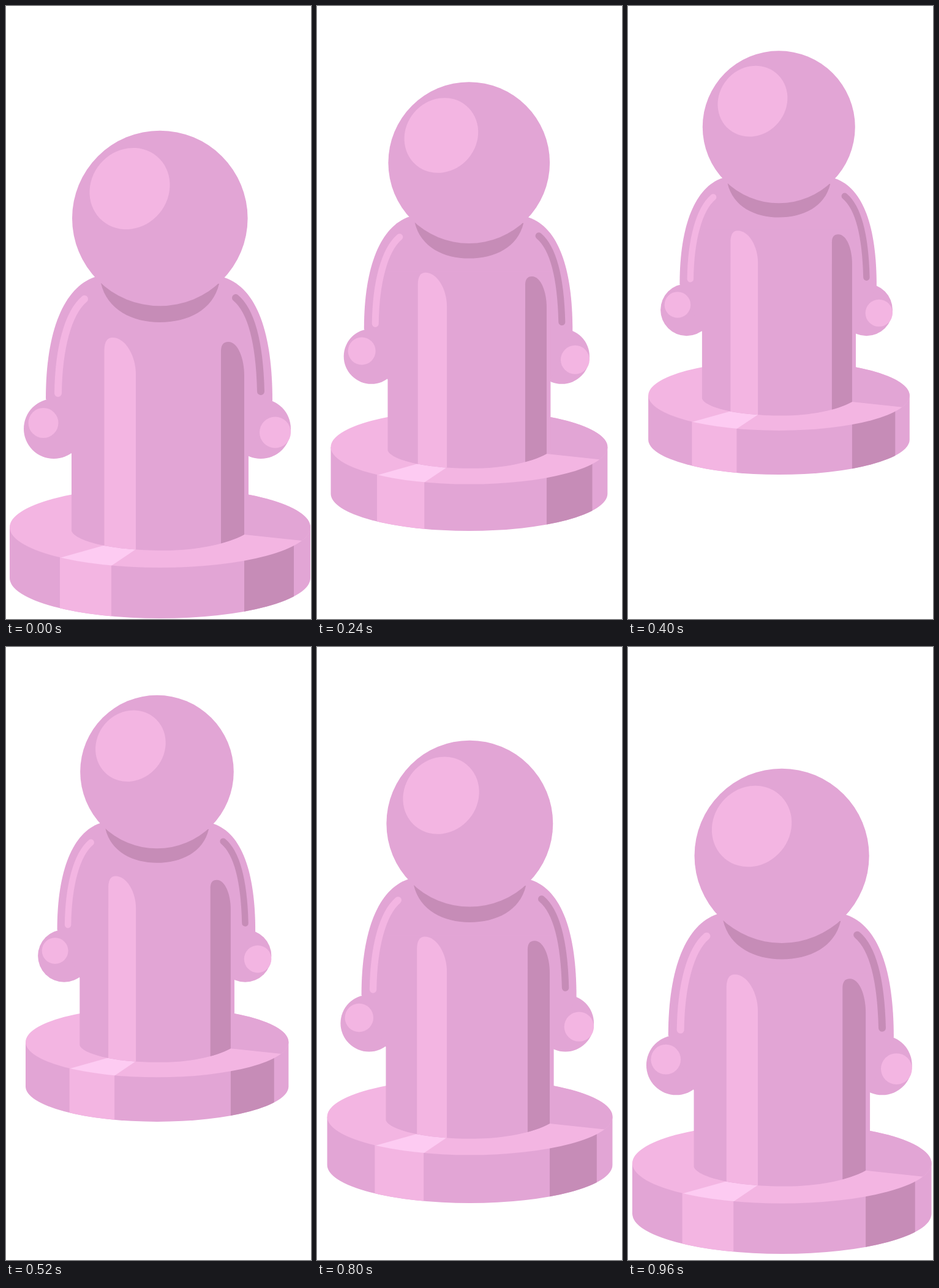
Write an HTML page with a canvas that moves like this. It is 498 px wide and 1002 px high and loops after 1000 ms.

```html
<!DOCTYPE html>
<html lang="en">
<head>
<meta charset="utf-8">
<title>Hopping pawn</title>
<style>
html, body { margin: 0; width: 100%; height: 100%; overflow: hidden; background: #fff; }
canvas { display: block; width: 498px; height: 1002px; }
</style>
</head>
<body>
<canvas id="stage" width="498" height="1002"></canvas>
<script>
const ctx = document.getElementById('stage').getContext('2d');

const BODY = '#e2a5d5', LIGHT = '#f3b5e2', DARK = '#c68cb7', SHINE = '#fdcbf2';
const LOOP = 1000, STEP = 40;

// The pawn shrinks towards this point as it rises.
const PIVOT = { x: 213, y: -791 };
const SCALE_KEYS = [
  [0, 1], [240, 0.9202], [400, 0.8689], [440, 0.8535], [480, 0.864], [520, 0.8744],
  [560, 0.8844], [680, 0.9163], [800, 0.9487], [960, 0.995], [1000, 1]
];

const FRONT = 'M107 732 V858 C112 873 165 890 258 890 C310 890 360 880 389 864 H396 V732';
const shapes = {
  side: new Path2D('M6 852 V935 A245.5 66 0 0 0 497 935 V852 Z'),
  plate: new Path2D('M6 852 A245.5 66 0 0 0 497 852 A245.5 66 0 0 0 6 852 Z'),
  plateShade: new Path2D('M389 780 V864 L483 874 H498 V780 Z'),
  plateShine: new Path2D('M88 902 L159 882 L212 888 L172 915 V925 H88 Z'),
  front: new Path2D(FRONT + ' V540 H107 Z'),
  torso: new Path2D('M145 443 C95 460 65 530 65 642 L107 732 H396 L435 645 C435 535 410 462 357 444 Z'),
  stripeLight: new Path2D('M160.5 900 V562 Q161 542 174 542 C195 542 212 572 212 602 V900 Z'),
  stripeDark: new Path2D('M351 900 V564 Q351 549 363 549 C379 549 389 577 389 604 V900 Z'),
  neck: new Path2D('M155 453 C165 497 207 517 251 517 C297 517 338 497 348 454 Z'),
  armLight: new Path2D('M128 479 C101 502 86 560 85 633'),
  armDark: new Path2D('M375 477 C400 498 414 550 416 630')
};

function fill(path, color) {
  ctx.fillStyle = color;
  ctx.fill(path);
}

function oval(x, y, rx, ry, color, turn = 0) {
  ctx.fillStyle = color;
  ctx.beginPath();
  ctx.ellipse(x, y, rx, ry, turn, 0, Math.PI * 2);
  ctx.fill();
}

function within(path, draw) {
  ctx.save();
  ctx.clip(path);
  draw();
  ctx.restore();
}

function stroke(path, color) {
  ctx.strokeStyle = color;
  ctx.stroke(path);
}

function drawBase() {
  fill(shapes.side, BODY);
  within(shapes.side, () => {
    ctx.fillStyle = LIGHT;
    ctx.fillRect(88, 850, 84, 160);
    ctx.fillStyle = DARK;
    ctx.fillRect(389, 850, 81, 160);
  });
  fill(shapes.plate, LIGHT);
  within(shapes.plate, () => {
    fill(shapes.plateShade, BODY);
    fill(shapes.plateShine, SHINE);
  });
}

function drawBody() {
  oval(78, 691, 49, 49, BODY);
  oval(416, 691, 49, 49, BODY);
  fill(shapes.torso, BODY);
  fill(shapes.front, BODY);
  within(shapes.front, () => {
    fill(shapes.stripeLight, LIGHT);
    fill(shapes.stripeDark, DARK);
  });
  oval(61, 681.5, 24.5, 24.5, LIGHT);
  oval(439.5, 697, 25.5, 25.5, LIGHT);
  ctx.lineWidth = 12;
  ctx.lineCap = 'round';
  stroke(shapes.armLight, LIGHT);
  stroke(shapes.armDark, DARK);
}

function drawHead() {
  fill(shapes.neck, DARK);
  oval(251.3, 347, 143.3, 143.3, BODY);
  oval(202, 298.5, 69, 63, LIGHT, -50 * Math.PI / 180);
}

function scaleAt(t) {
  const i = SCALE_KEYS.findIndex(key => key[0] > t);
  const [t0, s0] = SCALE_KEYS[i - 1], [t1, s1] = SCALE_KEYS[i];
  return s0 + (s1 - s0) * (t - t0) / (t1 - t0);
}

function render(now) {
  const t = Math.floor((now % LOOP) / STEP) * STEP;
  const s = scaleAt(t);
  ctx.setTransform(1, 0, 0, 1, 0, 0);
  ctx.fillStyle = '#fff';
  ctx.fillRect(0, 0, 498, 1002);
  ctx.setTransform(s, 0, 0, s, PIVOT.x * (1 - s), PIVOT.y * (1 - s));
  drawBase();
  drawBody();
  drawHead();
}

let start;
function tick(now) {
  start ??= now;
  render(now - start);
  requestAnimationFrame(tick);
}
render(0);
requestAnimationFrame(tick);
</script>
</body>
</html>
```
